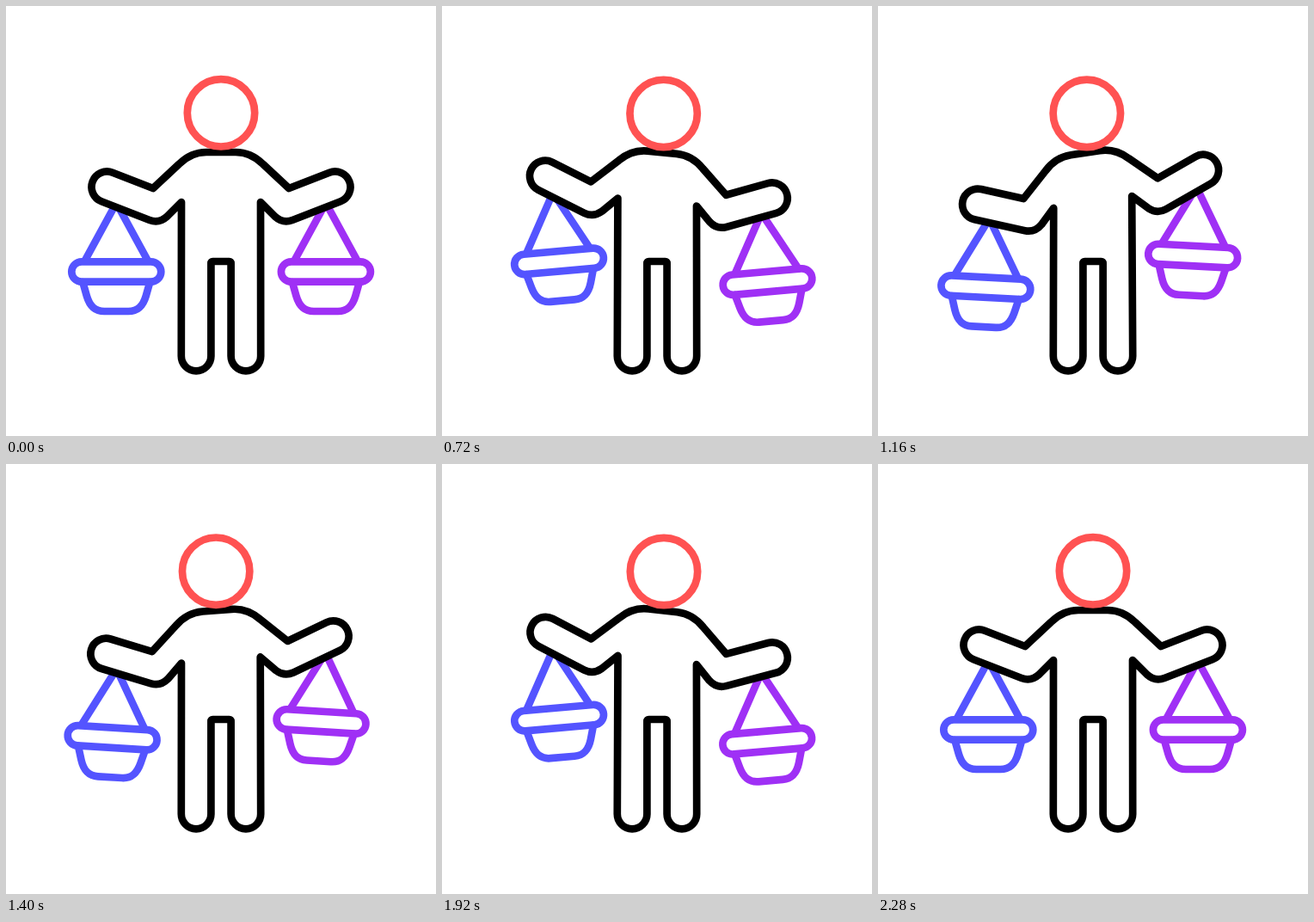
Recreate the animation shown at these times as an HTML page. Size 500 by 500 pixels, loop 2600 ms.

```html
<!DOCTYPE html>
<html lang="en">
<head>
<meta charset="utf-8">
<title>Balance</title>
<style>
  html, body { margin: 0; width: 100%; height: 100%; overflow: hidden; background: #fff; }
  svg { display: block; width: 100vw; height: 100vh; }
  svg * { stroke-width: 8.7; stroke-linecap: round; stroke-linejoin: round; }
</style>
</head>
<body>
<svg viewBox="0 0 500 500">
  <defs>
    <g id="pan" fill="none">
      <path d="M-36 -14L0 -80L36 -14"/>
      <path d="M-39 12L-34.5 28C-31 40 -25 46 -14 46H14C25 46 31 40 34.5 28L39 12"/>
      <rect x="-52" y="-11.7" width="104" height="23.4" rx="11.7"/>
    </g>
  </defs>
  <use id="left" href="#pan" stroke="#5454ff"/>
  <use id="right" href="#pan" stroke="#9f30f5"/>
  <path id="body" fill="#fff" stroke="#000"/>
  <circle id="head" cx="250" cy="124.3" r="39.2" fill="none" stroke="#ff5252"/>
</svg>
<script>
const LOOP = 2600, STEP = 40;
const CENTER = { x: 250, y: 230 };

// [time in ms, value]; tilt and swing in degrees, nod in pixels
const TILT = [[200, 0], [560, 6.4], [640, 6.4], [1180, -8.7], [1200, -8.7], [1760, 6.4], [1920, 6.4], [2280, 0]];
const SWING = [[200, 0], [700, 5.1], [1300, -4.2], [1880, 5.1], [1920, 5], [2280, 0]];
const NOD = [[200, 0], [700, 7.7], [1240, -8], [1910, 8], [2280, 0]];

const el = id => document.getElementById(id);

function sample(keys, t) {
  if (t <= keys[0][0]) return keys[0][1];
  for (let i = 1; i < keys.length; i++) {
    const [t0, v0] = keys[i - 1], [t1, v1] = keys[i];
    if (t <= t1) {
      const ease = (1 - Math.cos(Math.PI * (t - t0) / (t1 - t0))) / 2;
      return v0 + (v1 - v0) * ease;
    }
  }
  return keys[keys.length - 1][1];
}

function turn(x, y, deg) {
  const a = deg * Math.PI / 180, c = Math.cos(a), s = Math.sin(a);
  const dx = x - CENTER.x, dy = y - CENTER.y;
  return [CENTER.x + dx * c - dy * s, CENTER.y + dx * s + dy * c];
}

// The upper body turns; the legs stay planted.
function bodyPath(tilt) {
  const p = (x, y) => turn(x, y, tilt).map(v => v.toFixed(2)).join(" ");
  const m = (x, y) => p(500 - x, y);
  return `M${p(233, 170)}Q${p(215, 170)} ${p(201, 184)}L${p(171, 212)}L${p(124, 193.7)}` +
    `A18 18 0 0 0 ${p(111, 227.3)}L${p(167, 249)}Q${p(178, 253)} ${p(187, 245)}L${p(204, 228)}` +
    `L203.8 407A17.3 17.3 0 0 0 238.4 407V299Q238.4 297 240.4 297H259.6Q261.6 297 261.6 299` +
    `V407A17.3 17.3 0 0 0 296.2 407L${m(204, 228)}L${m(187, 245)}Q${m(178, 253)} ${m(167, 249)}` +
    `L${m(111, 227.3)}A18 18 0 0 0 ${m(124, 193.7)}L${m(171, 212)}L${m(201, 184)}` +
    `Q${m(215, 170)} ${m(233, 170)}Z`;
}

function hang(id, x, tilt, swing) {
  const [px, py] = turn(x, 229, tilt);
  el(id).setAttribute("transform", `translate(${px} ${py}) rotate(${-swing}) translate(0 80)`);
}

function draw(now) {
  const t = Math.floor((now % LOOP) / STEP) * STEP;
  const tilt = sample(TILT, t), swing = sample(SWING, t), nod = sample(NOD, t);
  el("body").setAttribute("d", bodyPath(tilt));
  hang("left", 128.3, tilt, swing);
  hang("right", 371.9, tilt, swing);
  el("head").setAttribute("transform", `translate(${nod} ${nod * nod / 90})`);
}

const start = performance.now();
function tick() {
  draw(performance.now() - start);
  requestAnimationFrame(tick);
}
tick();
</script>
</body>
</html>
```
